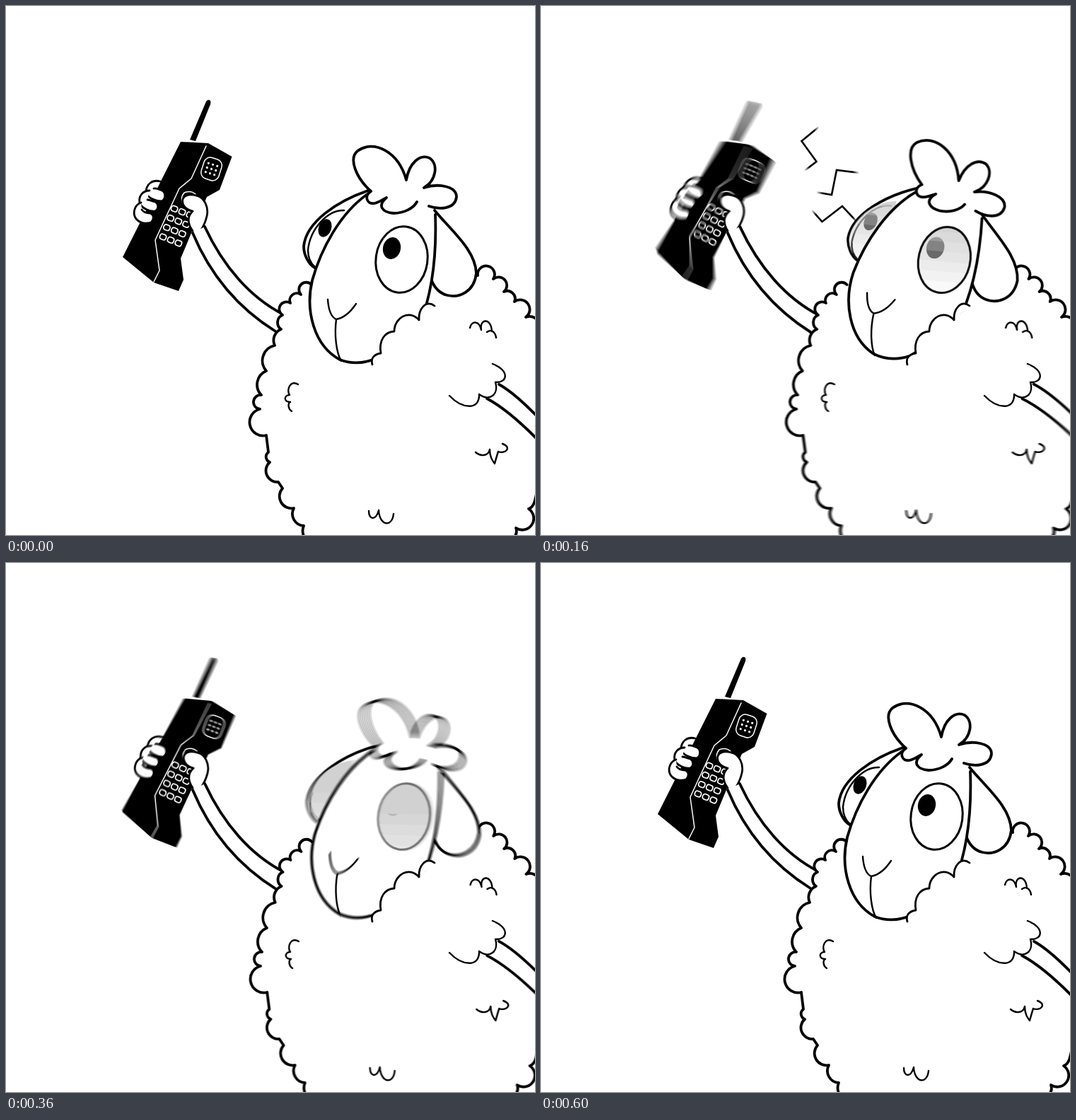
These frames come from a looping animation (748 by 748 pixels, 1.44 s). An HTML page without scripts:

```html
<!DOCTYPE html>
<html lang="en">
<head>
<meta charset="utf-8">
<title>Sheep with a ringing phone</title>
<style>
html, body { margin: 0; width: 100%; height: 100%; overflow: hidden; background: #fff; }

/* p phone swing, h head turn, l eyelid, s/e ring line start and end;
   dp, dh, dl: how far each travels while the shutter is open */
svg {
  display: block; width: 100vw; height: 100vh;
  fill: #fff; stroke: #000; stroke-width: 3.8; stroke-linecap: round; stroke-linejoin: round;
  animation: pose 1.44s step-end infinite;
}
@keyframes pose {
  0%     { --p: 0;   --dp: 0;    --h: 0;   --dh: 0;    --l: -.1; --dl: 0; --s: 0; --e: 0; }
  2.77%  { --p: .06; --dp: .24;  --h: 0;   --dh: .05;  --s: -8; --e: 1; }
  5.55%  { --p: .48; --dp: .43;  --h: 0;   --dh: .2;   --s: -8; --e: 35; }
  8.33%  { --p: .71; --dp: .31;  --h: .4;  --dh: .48;  --s: -5; --e: 61; }
  11.11% { --p: .7;  --dp: -.52; --h: .95; --dh: .07;  --l: -.05; --dl: .98; --s: 17; --e: 85; }
  13.88% { --p: .09; --dp: .23;  --h: .75; --dh: -.55; --l: 1.2; --dl: 0; --s: 37; --e: 101; }
  16.66% { --p: .48; --dp: .43;  --h: .1;  --dh: .1;   --s: 58; --e: 103; }
  19.44% { --p: .71; --dp: .31;  --h: .4;  --dh: .48;  --s: 84; --e: 110; }
  22.22% { --p: .7;  --dp: -.52; --h: .95; --dh: .07;  --s: 0; --e: 0; }
  24.99% { --p: .09; --dp: .23;  --h: .75; --dh: -.55; --l: 1.5; --dl: -1.05; }
  27.77% { --p: .48; --dp: .43;  --h: .1;  --dh: .1;   --l: .4; --dl: -.45; }
  30.55% { --p: .71; --dp: .31;  --h: .4;  --dh: .48;  --l: -.1; --dl: 0; }
  33.33% { --p: .7;  --dp: -.52; --h: .95; --dh: .07; }
  36.11% { --p: .2;  --dp: -.15; --h: .6;  --dh: -.45; }
  38.88% { --p: 0;   --dp: 0;    --h: .06; --dh: -.04; }
  41.66% { --h: 0;   --dh: 0; }
}

/* Eight averaged exposures make the motion blur */
.shot {
  --k: calc((var(--i) - 1) / 7);
  --P: calc(var(--p) + var(--dp) * var(--k));
  --H: calc(var(--h) + var(--dh) * var(--k));
  --L: calc(var(--l) + var(--dl) * var(--k));
  opacity: calc(1 / var(--i));
}
.phone { transform-origin: 264px 318px; transform: rotate(calc(var(--P) * 11deg)); }
.arm { transform-origin: 264px 318px; transform: scale(calc(1 + var(--P) * .035)); }
.body { transform-origin: 0 330px; transform: skewX(calc(var(--P) * 1.2deg)); }
.limb { transform-origin: 688px 545px; transform: rotate(calc(var(--P) * -5deg)); }
.head { transform-origin: 559px 476px; transform: rotate(calc(var(--H) * 5.4deg)); }
.hair { transform-origin: 575px 275px; transform: rotate(calc(var(--H) * 6.5deg)); }
.lid { fill: #d1d1d1; stroke: none; transform: translateY(calc(var(--L) * 100px)); }
.rim { opacity: calc(6 - 6 * var(--L)); }
.ring {
  fill: none; stroke-width: 2.6; stroke-linecap: butt; stroke-linejoin: miter;
  stroke-dasharray: calc((var(--e) - var(--s)) * 1px) 300px;
  stroke-dashoffset: calc((var(--s) + 7 * var(--k)) * -1px);
}
.paper { stroke: none; }
.line { fill: none; }
.thin { fill: none; stroke-width: 2.4; }
.ink { fill: #000; stroke: none; }
</style>
</head>
<body>
<svg viewBox="0 0 748 748">
<defs>
  <clipPath id="leftClip"><path d="M484 282C450 286 423 315 422 342C422 354 428 366 438 371L484 371Z"/></clipPath>
  <clipPath id="rightClip"><ellipse cx="559.5" cy="358.5" rx="38.5" ry="49" transform="rotate(8 559.5 358.5)"/></clipPath>

  <g id="keys"><rect x="-4.5" y="-3.8" width="9" height="7.6" rx="3"/><rect x="7.3" y="-3.8" width="9" height="7.6" rx="3"/><rect x="19.1" y="-3.8" width="9" height="7.6" rx="3"/></g>

  <g id="phone">
    <path class="ink" d="M260 189L283 135Q286 131 289 134Q290 136 289 139L268 191Z"/>
    <path class="ink" d="M247 192L286 194L319.5 213L302 260L284 270L262 321L247 357L251 387L244 403L209 391L165 355Z"/>
    <g fill="none" stroke="#fff" stroke-width="1.5">
      <path d="M283 198L262 244L245 258L211 331L217 374L209 390"/>
      <path d="M250 279Q246 271 252 264Q261 260 268 266"/>
      <rect x="-13" y="-15.5" width="26" height="31" rx="9" transform="translate(290.5 230.5) rotate(18)"/>
      <g transform="translate(290.5 230.5) rotate(18)" stroke-width="3.2" stroke-dasharray="0 6.5">
        <path d="M-6.5 -6.5H7M-6.5 0H7M-6.5 6.5H7"/>
      </g>
      <g transform="translate(222 326.5) rotate(22)" stroke-width="1.7">
        <use href="#keys"/><use href="#keys" y="-14.3"/><use href="#keys" y="-28.6"/><use href="#keys" y="-42.9"/>
      </g>
    </g>
    <g stroke-width="2.8">
      <path d="M218 248C207 245 198 252 198 263C200 272 212 276 220 276C226 273 226 264 221 261C216 259 212 257 209 258"/>
      <path d="M203 261C193 261 187 269 189 279C193 287 204 291 211 290C216 287 216 280 211 277C206 276 204 274 200 274"/>
      <path d="M191 278C182 281 178 293 184 301C190 308 199 308 205 306C210 301 209 295 204 293C199 293 194 291 192 288"/>
      <path d="M264 318C256 307 257 297 264 290C254 288 248 281 250 273C253 266 262 266 269 268C280 270 287 284 284 297C282 306 279 312 275 318"/>
    </g>
  </g>

  <g id="arm">
    <path class="paper" d="M281 312C307 368 345 412 396 438L384 462C336 432 292 388 264 321Z"/>
    <path class="line" d="M281 312C307 368 345 412 392 436M264 321C292 388 336 432 381 460"/>
  </g>

  <g id="body">
    <path d="M432 394A9 9 0 0 0 417 408A10 10 0 0 0 402 420A10 10 0 0 0 391 437A10 11 0 0 0 389 457A17 17 0 0 0 380 480A22 22 0 0 0 368 516A21 21 0 0 0 361 550A10 10 0 0 0 359 570A19 19 0 0 0 368 607L371 631A8 8 0 0 0 373 645A16 16 0 0 0 385 673L391 682A17 17 0 0 0 407 710A17 17 0 0 0 421 735A18 18 0 0 0 426 756"/>
    <path d="M667 381A12 12 0 1 1 689 386A11 11 0 0 1 704 404A11 11 0 0 1 719 418A12 12 0 0 1 735 440A14 14 0 0 1 754 456"/>
    <path class="line" d="M750 690C748 700 746 709 739 711A16 16 0 0 1 721 738A14 14 0 0 1 718 752"/>
    <g class="thin">
      <path d="M656 455C658 445 669 444 672 458C669 442 686 440 687 460M680 461C687 456 692 462 693 469"/>
      <path d="M413 535C402 528 396 543 401 550C393 550 392 560 402 560C398 562 399 570 404 573"/>
      <path d="M513 714C513 727 523 728 527 713C528 735 546 738 548 718"/>
      <path d="M664 631C671 637 682 637 684 627C684 638 688 643 691 647C693 640 694 636 696 630C706 634 716 624 702 619"/>
    </g>
  </g>
  <path id="limb" class="line" d="M697 535C717 546 738 566 762 592M680 555C706 569 732 592 762 624"/>

  <g id="back">
    <path d="M606 289C630 318 664 345 665 378C662 405 640 413 624 409C612 406 605 397 601 386"/>
    <path d="M512 261C470 275 424 305 421 340C421 352 428 366 438 371"/>
    <path class="thin" d="M478 289C455 288 430 315 427 345C427 355 431 364 437 369"/>
    <ellipse class="ink" cx="451" cy="314" rx="9" ry="13" transform="rotate(20 451 314)"/>
  </g>

  <g id="face">
    <path d="M514 264C472 292 445 345 433 388C423 430 435 480 472 500C490 507 508 505 524 498L585 450C603 405 609 350 607 295"/>
    <path class="thin" d="M455 415C456 430 460 440 467 443C478 441 487 433 495 421M467 443C464 465 467 490 474 502"/>
    <ellipse class="ink" cx="545.5" cy="342.5" rx="12.5" ry="15.5" transform="rotate(12 545.5 342.5)"/>
  </g>
  <ellipse id="rim" fill="none" stroke-width="3" cx="559.5" cy="358.5" rx="36.5" ry="47" transform="rotate(8 559.5 358.5)"/>

  <g id="hair">
    <path d="M516 262C495 243 484 216 497 205C520 188 555 206 566 246C570 222 585 209 599 215C612 224 608 247 591 257C612 250 637 255 637 270C635 288 612 288 598 283"/>
    <path d="M516 262C506 268 510 281 521 279C527 278 532 274 538 271C524 283 533 292 548 293C563 293 576 286 581 277"/>
  </g>

  <g id="fluff">
    <path class="paper" d="M525 513L530 491L549 460L584 444L606 424L600 520Z"/>
    <path stroke-width="2.8" d="M518 507C515 497 522 492 530 491C527 473 535 461 549 460C549 441 570 428 584 444C583 428 594 415 606 424"/>
    <path class="thin" d="M627 551C645 570 670 572 669 549C684 560 697 549 692 532C710 533 712 515 688 506"/>
  </g>

  <g id="ring">
    <path pathLength="100" d="M357 245L389.5 220L368.5 191L400 165"/>
    <path pathLength="100" d="M370 260L411 267L418 232L459 237"/>
    <path pathLength="100" d="M370 274L397.5 305L426 283L453 312"/>
  </g>

  <rect id="paper" class="paper" width="748" height="748"/>
</defs>

<g class="shot" style="--i:1"><use href="#paper"/><g class="phone"><use href="#phone"/></g><g class="arm"><use href="#arm"/></g><g class="body"><use href="#body"/></g><g class="limb"><use href="#limb"/></g><g class="head"><use href="#back"/><g clip-path="url(#leftClip)"><rect class="lid" x="415" y="-18" width="80" height="300"/></g><use href="#face"/><g clip-path="url(#rightClip)"><rect class="lid" x="515" y="10" width="90" height="300"/></g><g class="rim"><use href="#rim"/></g><g class="hair"><use href="#hair"/></g></g><use href="#fluff"/><g class="ring"><use href="#ring"/></g></g>
<g class="shot" style="--i:2"><use href="#paper"/><g class="phone"><use href="#phone"/></g><g class="arm"><use href="#arm"/></g><g class="body"><use href="#body"/></g><g class="limb"><use href="#limb"/></g><g class="head"><use href="#back"/><g clip-path="url(#leftClip)"><rect class="lid" x="415" y="-18" width="80" height="300"/></g><use href="#face"/><g clip-path="url(#rightClip)"><rect class="lid" x="515" y="10" width="90" height="300"/></g><g class="rim"><use href="#rim"/></g><g class="hair"><use href="#hair"/></g></g><use href="#fluff"/><g class="ring"><use href="#ring"/></g></g>
<g class="shot" style="--i:3"><use href="#paper"/><g class="phone"><use href="#phone"/></g><g class="arm"><use href="#arm"/></g><g class="body"><use href="#body"/></g><g class="limb"><use href="#limb"/></g><g class="head"><use href="#back"/><g clip-path="url(#leftClip)"><rect class="lid" x="415" y="-18" width="80" height="300"/></g><use href="#face"/><g clip-path="url(#rightClip)"><rect class="lid" x="515" y="10" width="90" height="300"/></g><g class="rim"><use href="#rim"/></g><g class="hair"><use href="#hair"/></g></g><use href="#fluff"/><g class="ring"><use href="#ring"/></g></g>
<g class="shot" style="--i:4"><use href="#paper"/><g class="phone"><use href="#phone"/></g><g class="arm"><use href="#arm"/></g><g class="body"><use href="#body"/></g><g class="limb"><use href="#limb"/></g><g class="head"><use href="#back"/><g clip-path="url(#leftClip)"><rect class="lid" x="415" y="-18" width="80" height="300"/></g><use href="#face"/><g clip-path="url(#rightClip)"><rect class="lid" x="515" y="10" width="90" height="300"/></g><g class="rim"><use href="#rim"/></g><g class="hair"><use href="#hair"/></g></g><use href="#fluff"/><g class="ring"><use href="#ring"/></g></g>
<g class="shot" style="--i:5"><use href="#paper"/><g class="phone"><use href="#phone"/></g><g class="arm"><use href="#arm"/></g><g class="body"><use href="#body"/></g><g class="limb"><use href="#limb"/></g><g class="head"><use href="#back"/><g clip-path="url(#leftClip)"><rect class="lid" x="415" y="-18" width="80" height="300"/></g><use href="#face"/><g clip-path="url(#rightClip)"><rect class="lid" x="515" y="10" width="90" height="300"/></g><g class="rim"><use href="#rim"/></g><g class="hair"><use href="#hair"/></g></g><use href="#fluff"/><g class="ring"><use href="#ring"/></g></g>
<g class="shot" style="--i:6"><use href="#paper"/><g class="phone"><use href="#phone"/></g><g class="arm"><use href="#arm"/></g><g class="body"><use href="#body"/></g><g class="limb"><use href="#limb"/></g><g class="head"><use href="#back"/><g clip-path="url(#leftClip)"><rect class="lid" x="415" y="-18" width="80" height="300"/></g><use href="#face"/><g clip-path="url(#rightClip)"><rect class="lid" x="515" y="10" width="90" height="300"/></g><g class="rim"><use href="#rim"/></g><g class="hair"><use href="#hair"/></g></g><use href="#fluff"/><g class="ring"><use href="#ring"/></g></g>
<g class="shot" style="--i:7"><use href="#paper"/><g class="phone"><use href="#phone"/></g><g class="arm"><use href="#arm"/></g><g class="body"><use href="#body"/></g><g class="limb"><use href="#limb"/></g><g class="head"><use href="#back"/><g clip-path="url(#leftClip)"><rect class="lid" x="415" y="-18" width="80" height="300"/></g><use href="#face"/><g clip-path="url(#rightClip)"><rect class="lid" x="515" y="10" width="90" height="300"/></g><g class="rim"><use href="#rim"/></g><g class="hair"><use href="#hair"/></g></g><use href="#fluff"/><g class="ring"><use href="#ring"/></g></g>
<g class="shot" style="--i:8"><use href="#paper"/><g class="phone"><use href="#phone"/></g><g class="arm"><use href="#arm"/></g><g class="body"><use href="#body"/></g><g class="limb"><use href="#limb"/></g><g class="head"><use href="#back"/><g clip-path="url(#leftClip)"><rect class="lid" x="415" y="-18" width="80" height="300"/></g><use href="#face"/><g clip-path="url(#rightClip)"><rect class="lid" x="515" y="10" width="90" height="300"/></g><g class="rim"><use href="#rim"/></g><g class="hair"><use href="#hair"/></g></g><use href="#fluff"/><g class="ring"><use href="#ring"/></g></g>
</svg>
</body>
</html>
```
